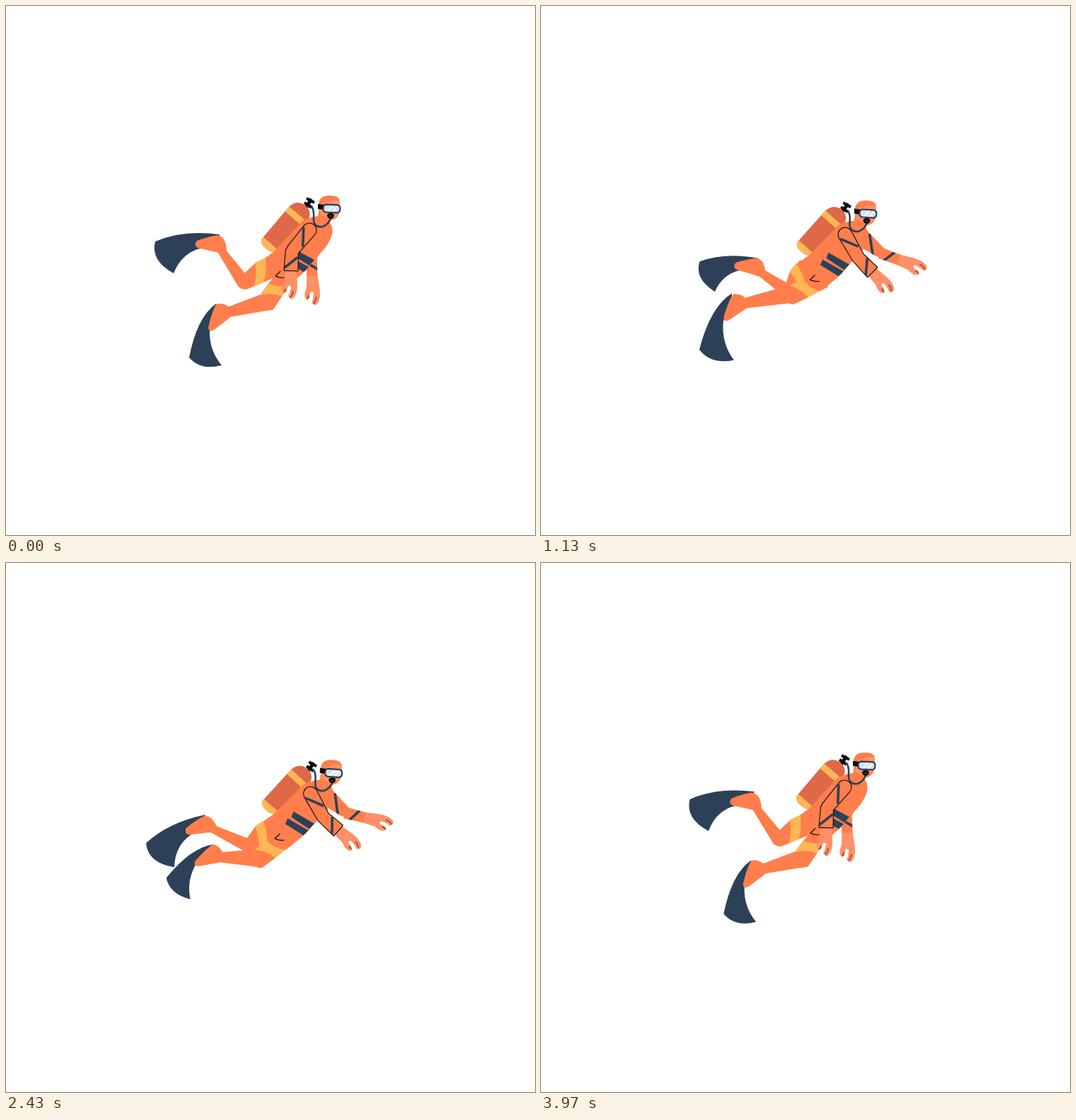
An HTML page with a canvas for the animation above (4.01 s loop, 748 by 748 pixels).

```html
<!DOCTYPE html>
<html>
<head>
<meta charset="utf-8">
<style>
html, body { margin: 0; width: 100%; height: 100%; overflow: hidden; background: #fff; }
canvas { display: block; }
</style>
</head>
<body>
<canvas width="748" height="748"></canvas>
<script>
const ctx = document.querySelector('canvas').getContext('2d');
const SUIT = '#ff7e4c', SKIN = '#ff9068', TANK = '#df6848', YELLOW = '#ffb655', NAVY = '#2c4158', BLACK = '#0b0b0e';
const LOOP = 4010;

const ease = x => (1 - Math.cos(Math.PI * x)) / 2;
const mix = (a, b, p) => a + (b - a) * p;

function fill(d, color) {
  ctx.fillStyle = color;
  ctx.fill(new Path2D(d));
}
function line(d, color, width, cap = 'butt') {
  ctx.strokeStyle = color;
  ctx.lineWidth = width;
  ctx.lineCap = cap;
  ctx.lineJoin = 'round';
  ctx.stroke(new Path2D(d));
}
function clipped(d, draw) {
  ctx.save();
  ctx.clip(new Path2D(d));
  draw();
  ctx.restore();
}
function within(m, draw) {
  ctx.save();
  ctx.transform(m.a, m.b, m.c, m.d, m.e, m.f);
  draw();
  ctx.restore();
}

// Turns a part about its rest joint and stretches it along its axis, then moves the joint to `at`.
function pose(at, rest, axis, turn, stretch, width = 1) {
  return new DOMMatrix().translate(at[0], at[1]).rotate(axis + turn)
    .scale(stretch, width).rotate(-axis).translate(-rest[0], -rest[1]);
}
function carry(m, p) {
  const q = m.transformPoint({ x: p[0], y: p[1] });
  return [q.x, q.y];
}

const upperLeg = {
  joints: [[370, 370], [338, 389], [303, 340]],
  axes: [149, 234, 170],
  thigh: 'M375 354L352 364L338 377L329 396Q333 402 342 400L380 384L390 368Z',
  band: 'M352 363L367 356Q369 378 364 391L351 396Q355 378 352 363Z',
  shin: 'M297 344L328 396Q333 402 341 400Q350 394 346 384L338 378L311 345Z',
  foot: 'M312 347Q312 327 299 324Q286 326 270 332Q265 338 271 342L297 348Q306 352 312 347Z',
  fin: 'M302 323Q250 316 211 333Q204 360 237 378Q248 350 274 343L298 340Z'
};
const lowerLeg = {
  joints: [[392, 388], [368, 420], [314, 432]],
  axes: [127, 167, 115],
  thigh: 'M406 385L398 397L390 411L378 429Q372 432 364 429L358 411L380 381L398 368Z',
  band: 'M371 392Q382 398 399 396L390 410Q374 405 359 409Z',
  shin: 'M360 408L315 425L315 440L373 430Q381 424 377 413Q370 405 360 408Z',
  foot: 'M318 428Q309 419 298 421Q292 428 286 455Q287 462 294 458L316 441Q321 434 318 428Z',
  fin: 'M297 421Q270 440 259 497Q275 516 305 508Q287 487 288 458L297 440Z'
};

// Each turn and stretch is [thigh, shin, foot].
function drawLeg(leg, turn, stretch) {
  const [hip, knee, ankle] = leg.joints;
  const thigh = pose(hip, hip, leg.axes[0], turn[0], stretch[0]);
  const shin = pose(carry(thigh, knee), knee, leg.axes[1], turn[1], stretch[1]);
  const at = carry(shin, ankle);
  within(pose(at, ankle, leg.axes[2], turn[2], stretch[2], stretch[2]), () => fill(leg.fin, NAVY));
  within(pose(at, ankle, leg.axes[2], turn[2], 1), () => fill(leg.foot, SUIT));
  within(shin, () => fill(leg.shin, SUIT));
  within(thigh, () => {
    fill(leg.thigh, SUIT);
    fill(leg.band, YELLOW);
  });
}

const nearArm = {
  shoulder: [429, 317], length: 39,
  upper: 'M0 -9.5A9.5 9.5 0 0 0 0 9.5L38 8.5Q46 6 46 0Q46 -6 38 -8.5Z',
  fore: 'M-2 -8Q-8 0 -2 8L27 9.5L27 -9.5L4 -9Z',
  stripes: ['M2 9L24 -8', 'M8 -9L24 10'],
  cuff: 25, outlined: true
};
const farArm = {
  shoulder: [448, 317], length: 42,
  upper: 'M0 -13Q-13 0 0 14L38 8Q48 4 47 -2Q46 -7 39 -8Z',
  fore: 'M-2 -8Q-8 0 -2 8L26 7.5L26 -7.5L4 -8Z',
  stripes: ['M11 -11L35 11', 'M18 -10L5 10'],
  cuff: 25, outlined: false
};

function drawHand() {
  fill('M-1 -7.5L14 -9Q27 -11 36 -8Q45 -4 41 1Q38 4 35 1L25 -1Q22 2 25 4L31 5Q37 8 33 11Q27 14 18 9L-1 7.5Z', SKIN);
  line('M31 -4Q36 -4 40 0M28 7Q31 6 33 9', '#4a2a28', 1);
}

function drawArm(arm, upperAngle, foreAngle) {
  const upper = new DOMMatrix().translate(...arm.shoulder).rotate(upperAngle);
  const fore = new DOMMatrix().translate(...carry(upper, [arm.length, 0])).rotate(foreAngle);
  const parts = [[upper, arm.upper], [fore, arm.fore]];
  within(fore, () => {
    ctx.translate(arm.cuff, 0);
    drawHand();
  });
  if (arm.outlined) for (const [m, d] of parts) within(m, () => line(d, BLACK, 2.2));
  for (const [m, d] of parts) within(m, () => fill(d, SUIT));
  parts.forEach(([m, d], i) => within(m, () => clipped(d, () => line(arm.stripes[i], NAVY, 3.6))));
}

function drawTank() {
  const shell = 'M361 330L400 284Q411 274 422 281Q433 289 428 301L386 348Q377 350 369 344Q360 338 361 330Z';
  line('M424 285L432 273', BLACK, 5);
  line('M422 278L432 285M425 272L436 278', BLACK, 4);
  fill(shell, TANK);
  clipped(shell, () => {
    line('M394 284L422 308', YELLOW, 9);
    line('M355 326L386 352', YELLOW, 10);
  });
}

function drawTorso() {
  fill('M420 303Q432 298 441 297L455 303Q464 311 461 323Q456 340 441 353L424 374L398 397L384 388L366 374L360 361L378 348Z', SUIT);
  fill('M406 343L436 359L429 367L403 351ZM398 353L428 369L421 376L395 361Z', NAVY);
}

function drawHead() {
  fill('M444 276L441 299Q450 306 461 303Q470 300 471 292L472 278Z', SUIT);
  fill('M446 279Q450 273 472 277L471 295Q464 301 452 299L444 295Z', SKIN);
  fill('M442 281Q442 268 458 268Q472 268 472 277Q459 273 447 280Z', SUIT);
  line('M459 300Q457 308 448 312Q434 314 435 299Q436 287 431 282', NAVY, 2.6);
  fill('M441 280L450 281L449 288L441 287Z', BLACK);
  ctx.save();
  ctx.translate(460.5, 286.5);
  ctx.rotate(0.04);
  const lens = 'M-8 -5.5H8Q12 -5 12 0Q12 5 8 5.5H-8Q-12 5 -12 0Q-12 -5 -8 -5.5Z';
  fill(lens, '#d3e3ee');
  clipped(lens, () => line('M-7 7L4 -7M0 7L10 -7', '#f4f9fc', 2.5));
  line(lens, NAVY, 2.2);
  ctx.restore();
  fill('M455 294Q459 292 463 294Q465 297 462 300Q458 302 455 299Q453 296 455 294Z', BLACK);
  line('M457 297H461', '#596675', 1);
}

// Smooth curve through four key poses of half a kick, mirrored at both ends.
const KEYS = [0, 430, 730, 1000];
function swing(kick, a, b, c, d) {
  const i = kick < KEYS[1] ? 0 : kick < KEYS[2] ? 1 : 2;
  const x = (kick - KEYS[i]) / (KEYS[i + 1] - KEYS[i]);
  const [p, q, r, s] = [b, a, b, c, d, c].slice(i, i + 4);
  return q + x / 2 * (r - p + x * (2 * p - 5 * q + 4 * r - s + x * (3 * (q - r) + s - p)));
}

function draw(now) {
  const t = now % LOOP / LOOP * 4000;
  const kick = 1000 - Math.abs(t % 2000 - 1000);
  const turn = (...v) => swing(kick, 0, ...v);
  const stretch = (...v) => swing(kick, 1, ...v);
  const reach = peak => ease(t < peak ? t / peak : (4000 - t) / (4000 - peak));
  const sink = ease(t / 2000);
  const lift = reach(1667), bend = reach(1750);

  ctx.clearRect(0, 0, 748, 748);
  ctx.save();
  ctx.translate(385 - sink, 385 + 8.5 * sink);
  ctx.rotate(2.4 * sink * Math.PI / 180);
  ctx.translate(-385, -385);

  drawArm(farArm, mix(113, 14, lift), mix(87, -8, bend));
  drawTank();
  drawTorso();
  drawLeg(upperLeg,
    [turn(-12, -28, -26), turn(-32, -33, -15), turn(-21.6, -4.7, 4.6)],
    [stretch(0.87, 0.87, 0.87), stretch(1.04, 0.88, 0.89), stretch(1.01, 0.9, 0.94)]);
  drawLeg(lowerLeg,
    [turn(18, 24, 32), turn(14.7, 14.7, -6), turn(26, 10.6, -2)],
    [stretch(1.06, 1.02, 1.05), stretch(0.96, 1.24, 1.14), stretch(0.96, 1.08, 1.07)]);
  line('M388 375L381 382Q386 385 394 384', BLACK, 1.2);
  drawHead();
  drawArm(nearArm, mix(130, 37, lift), mix(92, 25, bend));
  ctx.restore();
}

function tick() {
  draw(performance.now());
  requestAnimationFrame(tick);
}
tick();
</script>
</body>
</html>
```
